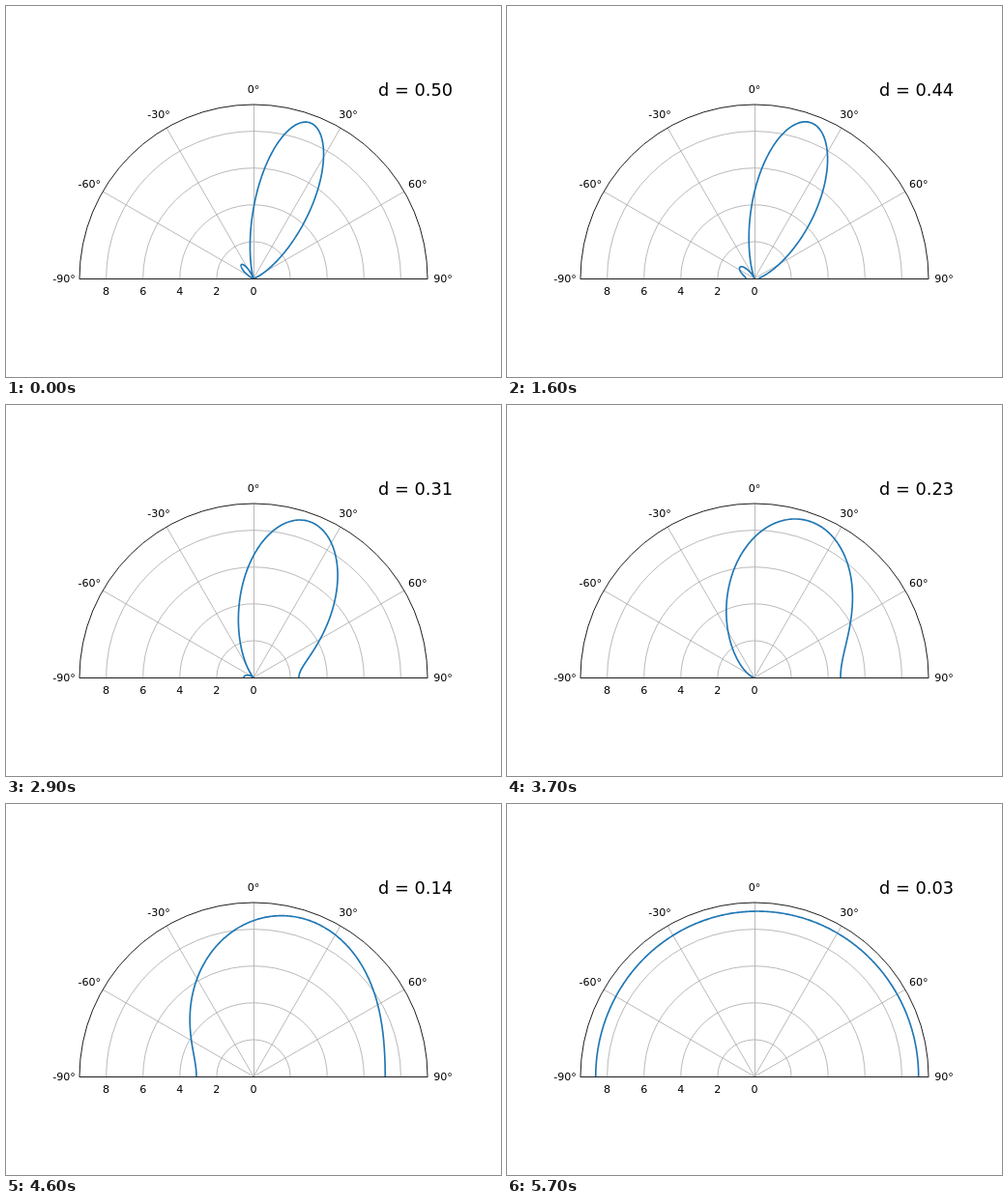
Recreate the animation shown at these times as an HTML page. Size 512 px wide and 384 px high, loop 5800 ms.

```html
<!DOCTYPE html>
<html lang="en">
<head>
<meta charset="utf-8">
<title>Beam pattern and element spacing</title>
<style>
  html, body { margin: 0; width: 100%; height: 100%; overflow: hidden; background: #fff; }
  svg { display: block; }
  text { font: 11.11px "DejaVu Sans", sans-serif; text-anchor: middle; }
  #label { font-size: 17.78px; text-anchor: start; }
  path { fill: none; stroke-width: .89; }
  #grid { stroke: #b0b0b0; }
  #beam { stroke: #1f77b4; stroke-width: 1.67; stroke-linejoin: round; stroke-linecap: square; }
  #frame { stroke: #000; }
</style>
</head>
<body>
<svg width="512" height="384" viewBox="0 0 512 384">
  <clipPath id="half"><path d="M76 282A180 180 0 0 1 436 282Z"/></clipPath>
  <path id="grid"/>
  <g clip-path="url(#half)"><path id="beam"/></g>
  <path id="frame" d="M76 282A180 180 0 0 1 436 282M75.6 282.5H436.4"/>
  <g id="ticks"></g>
  <text id="label" x="385" y="93"></text>
</svg>
<script>
const CX = 256, CY = 282, RADIUS = 180, UNIT = RADIUS / 9.45;
const STEP = 100, HOLD = 10, LOOP = 5800;
const RAD = Math.PI / 180, STEER = Math.sin(20 * RAD);
const $ = id => document.getElementById(id);

// Bearing in degrees from straight up, clockwise.
const polar = (deg, r) => [CX + r * Math.sin(deg * RAD), CY - r * Math.cos(deg * RAD)];
const point = (deg, r) => polar(deg, r).map(v => v.toFixed(2)).join(" ");

function drawAxes() {
  let grid = "", ticks = "";
  const tick = (x, y, s) => ticks += `<text x="${x}" y="${y}">${s}</text>`;
  for (let v = 0; v <= 8; v += 2) {
    const r = v * UNIT;
    if (v) grid += `M${CX - r} ${CY}A${r} ${r} 0 0 1 ${CX + r} ${CY}`;
    tick(CX - r, 299, v);
  }
  for (let a = -90; a <= 90; a += 30) {
    if (a === 0) grid += `M${CX + .5} ${CY}V${CY - RADIUS}`;
    else if (Math.abs(a) < 90) grid += `M${CX} ${CY}L${point(a, RADIUS)}`;
    const [x, y] = polar(a, 196);
    tick(x, Math.round(y + 4), a + "°");
  }
  $("grid").setAttribute("d", grid);
  $("ticks").innerHTML = ticks;
}

// Power of a three-element array with spacing d, in wavelengths.
function power(deg, d) {
  const phase = 2 * Math.PI * d * (Math.sin(deg * RAD) - STEER);
  return (1 + 2 * Math.cos(phase)) ** 2;
}

let shown = -1;
function draw(now) {
  const step = Math.max(0, Math.floor(now % LOOP / STEP) - HOLD);
  if (step !== shown) {
    shown = step;
    const d = (50 - step) / 100, points = [];
    for (let a = -90; a <= 90; a += .5) points.push(point(a, power(a, d) * UNIT));
    $("beam").setAttribute("d", "M" + points.join("L"));
    $("label").textContent = "d = " + d.toFixed(2);
  }
  requestAnimationFrame(draw);
}

drawAxes();
draw(performance.now());
</script>
</body>
</html>
```
